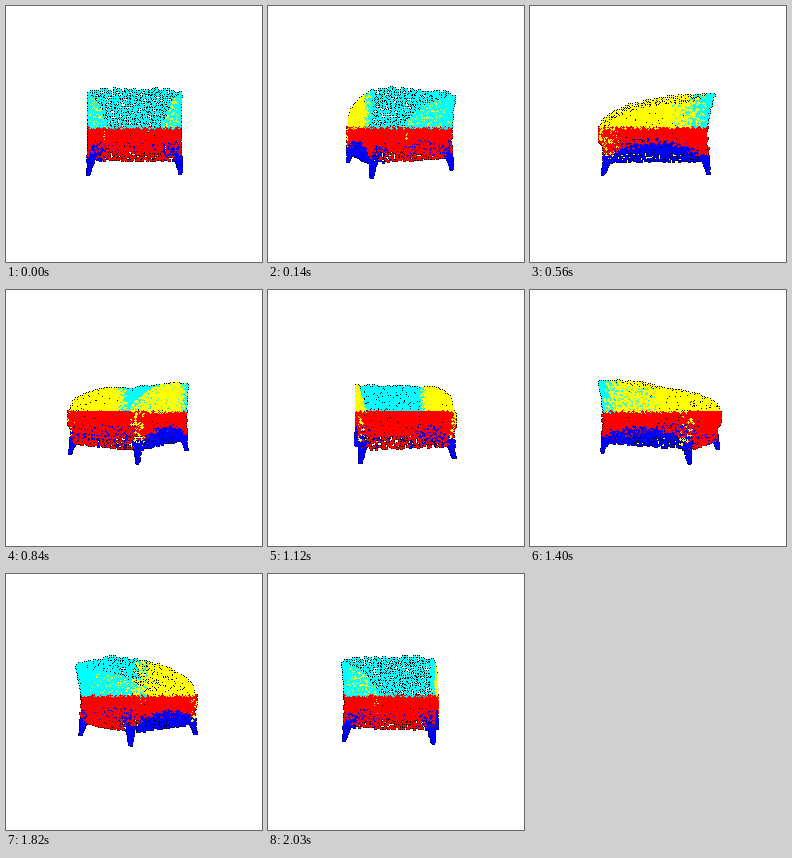
These frames come from a looping animation (256 px wide and 256 px high, 2100 ms). A matplotlib script:

```python
import numpy as np
import matplotlib.pyplot as plt
from matplotlib.animation import FuncAnimation

SIZE, FRAMES, STEP_MS = 256, 30, 70
CAMERA, CENTER_X, HORIZON = 230, 128, 122
DENSITY = 0.27
CYAN, YELLOW, RED, BLUE = range(4)
PALETTE = np.array([[0, 255, 255], [255, 255, 0], [255, 0, 0], [0, 0, 255]],
                   dtype=np.uint8)

rng = np.random.default_rng(7)
parts = []


def patch(a0, a1, b0, b1, density=DENSITY):
    """Jittered grid of samples over a rectangle."""
    step = density ** -0.5
    a, b = np.meshgrid(np.arange(a0, a1, step), np.arange(b0, b1, step))
    a = a.ravel() + rng.random(a.size) * step
    b = b.ravel() + rng.random(b.size) * step
    keep = (a < a1) & (b < b1)
    return a[keep], b[keep]


def chance(p):
    return rng.random(np.shape(p)) < p


def add(u, v, h, color, keep=True):
    u, v, h, color, keep = np.broadcast_arrays(u, v, h, color, keep)
    parts.append(np.stack([u, v, h, color])[:, keep])


def back_v(h):
    return 38.5 + 8.5 * (np.clip(h, 0, 32) / 32) ** 2


def front_v(u, h):
    bulge = 4 / (1 + np.exp((-13 - h) * 1.2))
    return -51 - bulge + 4 * (np.abs(u) / 38) ** 4


def build_back():
    u, h = patch(-38.5, 38.5, 0, 32)
    corner = (np.abs(u) / 38.5) ** 8
    add(u, back_v(h) - 3 * corner, h, CYAN, h < 31.6 - 4 * corner)

    u, h = patch(-38.5, 38.5, -27, 1)
    v = 38.5 - 3 * (np.abs(u) / 38.5) ** 8
    gusset = np.clip((np.abs(u) - 22) / 18, 0, 1) * np.clip((-11 - h) / 8, 0, 1)
    add(u, v, h, np.where(chance(gusset), BLUE, RED))


def build_front():
    u, h = patch(-38.5, 38.5, -28, 0.5)
    color = np.where(chance(0.4 * (np.abs(u) > 35)), YELLOW, RED)
    low = np.clip((-13 - h) / 8, 0, 1) * np.where(np.abs(u) > 34, 0.7, 0.12)
    color = np.where(chance(low), BLUE, color)
    add(u, front_v(u, h), h, color)


def build_side(sign):
    v, h = patch(-52, 47, 0, 30)
    top = 29.5 * np.sqrt(np.clip(1 - ((45 - v) / 97) ** 2, 0, 1))
    u = sign * (38.5 - 2 * (np.abs(v) / 47) ** 8)
    color = np.where(v > 37 - 22 * rng.random(v.size) ** 2, CYAN, YELLOW)
    add(u, v, h, color, (h < top) & (v < back_v(h)))

    v, h = patch(-53, 38.5, -28, 1)
    arch = -12.5 - 13 * (np.abs(v + 6) / 45) ** 2.2
    color = np.where(h < arch + rng.normal(0, 1.2, h.size), BLUE, RED)
    post = 0.4 * ((v < -41) & (h > -25))
    color = np.where(chance(post), YELLOW, color)
    add(sign * 38.5, v, h, color, v > front_v(37, h))


def build_leg(su, v0, splay):
    n = 75
    t, a = rng.random(n) ** 1.3, rng.random(n) * 2 * np.pi
    r = 3.2 - 2.6 * t
    u = su * (36 + 2.5 * t) + r * np.cos(a)
    add(u, v0 + splay * t + r * np.sin(a), -23 - 15.5 * t, BLUE)


def build_chair():
    build_back()
    build_front()
    u, v = patch(-37, 37, -50, 37, 0.2)
    add(u, v, rng.uniform(-1, 0.3, u.size), RED)
    for sign in (-1, 1):
        build_side(sign)
        build_leg(sign, 36, 3)
        build_leg(sign, -46, -3)
    return np.concatenate(parts, axis=1)


U, V, H, COLOR = build_chair()
RGB = PALETTE[COLOR.astype(int)]
CORE = [(0, -1), (-1, 0), (1, 0), (0, 1), (0, 0)]
RIM = [(-1, -1), (1, -1), (-1, 1), (1, 1)]


def render(i):
    angle = 2 * np.pi * i / FRAMES
    c, s = np.cos(angle), np.sin(angle)
    near = V * c - U * s
    scale = CAMERA / (CAMERA - near)
    x = np.rint(CENTER_X + (U * c + V * s) * scale).astype(int)
    y = np.rint(HORIZON - H * scale).astype(int)

    image = np.full((SIZE, SIZE, 3), 255, np.uint8)
    for dx, dy in RIM:
        image[y + dy, x + dx] = 0

    # Far points first, so nearer ones cover them.
    order = np.argsort(near)
    dx, dy = np.array(CORE).T
    px = (x[order][:, None] + dx).ravel()
    py = (y[order][:, None] + dy).ravel()
    image[py, px] = np.repeat(RGB[order], len(CORE), axis=0)
    return image


fig = plt.figure(figsize=(SIZE / 100, SIZE / 100), dpi=100, facecolor="white")
ax = fig.add_axes([0, 0, 1, 1])
ax.axis("off")
picture = ax.imshow(render(0), interpolation="none", aspect="auto")


def update(i):
    picture.set_data(render(i))
    return [picture]


anim = FuncAnimation(fig, update, frames=FRAMES, interval=STEP_MS,
                     repeat=True, repeat_delay=0)
plt.show()
```
